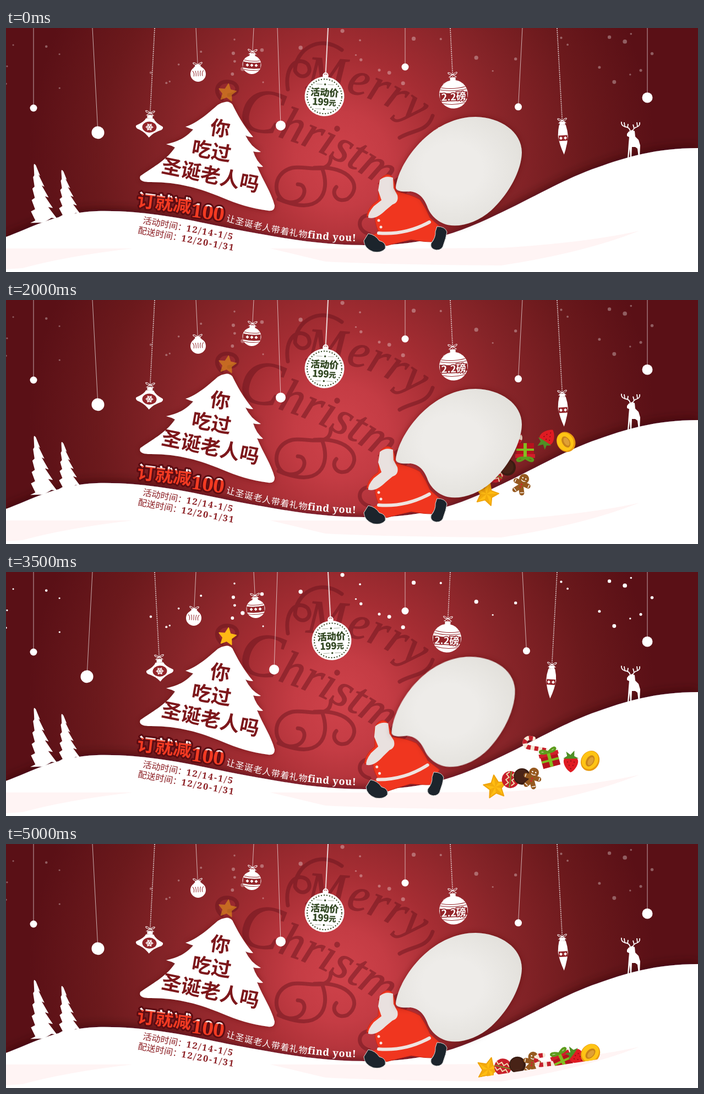
Recreate the animation shown at these times as an HTML page. Size 1257 by 445 pixels, loop 5.5 s.

```html
<!DOCTYPE html>
<html lang="zh">
<head>
<meta charset="utf-8">
<title>圣诞老人</title>
<style>
html, body { margin: 0; width: 100%; height: 100%; overflow: hidden; background: #5b1117; }
svg { display: block; width: 100%; height: 100%; }
text { font-family: "Noto Sans CJK SC", "Noto Sans CJK", sans-serif; font-weight: 900; }
.serif { font-family: "Noto Serif", "Noto Sans CJK SC", serif; font-weight: 600; }
.plain { font-weight: 500; }
.script text { font-family: "Liberation Serif", serif; font-style: italic; font-weight: 400; font-size: 86px; }
.script path { fill: none; stroke: #64121b; stroke-width: 7; stroke-linecap: round; }
.line { fill: none; stroke: #fff; }
</style>
</head>
<body>
<svg viewBox="0 0 1257 445" preserveAspectRatio="none">
<defs>
  <radialGradient id="sky" gradientUnits="userSpaceOnUse" cx="610" cy="240" r="570">
    <stop offset="0" stop-color="#cf424a"/>
    <stop offset=".15" stop-color="#c43c44"/>
    <stop offset=".33" stop-color="#a52d33"/>
    <stop offset=".55" stop-color="#862428"/>
    <stop offset=".78" stop-color="#6b191c"/>
    <stop offset="1" stop-color="#5a1016"/>
  </radialGradient>
  <radialGradient id="sack" cx=".45" cy=".48" r=".6">
    <stop offset=".4" stop-color="#eeece9"/>
    <stop offset="1" stop-color="#e2e0db"/>
  </radialGradient>
  <linearGradient id="cap" x2="0" y2="1">
    <stop offset=".28" stop-color="#fff"/>
    <stop offset=".33" stop-color="#f23a22"/>
  </linearGradient>
  <clipPath id="drift"><path d="M700 0H1257V365L857 426H700Z"/></clipPath>
  <path id="slogan" d="M399 352Q490 377 560 384T665 388"/>
  <path id="merry" d="M545 112Q660 105 765 190"/>
  <path id="xmas" d="M418 182Q560 200 730 320"/>
  <path id="star" d="M0-22 6.5-8 21-6.8 10.5 3.5 13 18 0 11-13 18-10.5 3.5-21-6.8-6.5-8Z" stroke-linejoin="round" stroke-width="2"/>
  <filter id="soft" x="-10%" y="-20%" width="120%" height="140%"><feDropShadow dx="0" dy="-3" stdDeviation="9" flood-color="#30040a" flood-opacity=".65"/></filter>
  <filter id="glow" x="-20%" y="-20%" width="140%" height="140%"><feDropShadow dx="0" dy="0" stdDeviation="6" flood-color="#50080f" flood-opacity=".5"/></filter>
</defs>

<rect width="1257" height="445" fill="url(#sky)"/>

<g class="script" fill="#64121b" stroke="#64121b" stroke-width="1.5" opacity=".45">
  <text><textPath href="#merry">Merry</textPath></text>
  <text><textPath href="#xmas"><tspan style="font-size:115px">C</tspan>hristmas</textPath></text>
  <path d="M512 112C505 70 530 50 548 66 560 85 535 98 525 78 525 40 570 10 610 40"/>
  <path d="M405 122C425 122 425 100 405 98 385 95 375 115 392 130"/>
  <path d="M590 235C590 270 545 250 520 255 480 265 485 315 515 318 545 320 550 285 530 285M560 255C625 250 650 290 620 312 600 320 590 300 600 290M575 258C590 300 570 345 495 312"/>
  <path d="M668 342C640 335 632 368 660 376M715 200C740 185 765 190 775 160"/>
</g>

<g id="dots" fill="#fff"></g>
<g id="hung" fill="#fff"></g>

<g filter="url(#soft)">
  <path fill="#fff" d="M0 381C40 367 90 337 165 334 260 332 340 352 400 364 500 383 570 396 650 396 730 397 790 386 860 355
    950 315 1010 276 1075 254 1125 236 1180 219 1257 219V445H0Z"/>
</g>
<path fill="#fff4f4" d="M0 402H230Q110 416 30 438L0 440ZM480 402Q700 403 900 401 1050 392 1150 370 1050 410 900 433 700 432 580 426 480 402Z"/>

<g id="firs" fill="#fff"></g>

<g fill="#fff">
  <path d="M1128 193L1131 189 1137 186 1142 188 1143 198 1149 204 1152 214 1151 236H1149L1147 220 1143 217 1137 217 1136 238H1134L1133 220 1131 238H1129L1131 210 1132 199 1128 197Z"/>
  <path class="line" stroke-width="1.8" d="M1134 188Q1133 181 1124 180 1117 178 1118 171M1124 180L1123 172M1129 182L1130 175M1138 188Q1140 182 1147 180 1152 178 1151 172M1147 180L1146 172M1141 183L1139 176"/>
</g>

<path filter="url(#glow)" fill="#fff" d="M398 135Q405 133 411 139C419 155 430 177 449 199Q441 199 435 196 444 216 463 226 456 227 449 225
  454 242 467 253 461 254 456 252C466 277 482 300 488 324Q488 335 476 333C445 329 420 321 392 309 352 292 310 280 258 281
  Q240 280 244 270C263 256 290 243 307 218Q300 214 291 212C312 207 326 201 340 185Q333 183 326 180C348 174 372 151 385 140Q391 136 398 135Z"/>
<use href="#star" id="top" transform="translate(402 118) rotate(8) scale(.75)" fill="#ffb915" stroke="#ffb915"/>

<g fill="#7d171b" font-size="36" text-anchor="middle">
  <text transform="translate(387 196) rotate(9)">你</text>
  <text transform="translate(371 237) rotate(10)">吃过</text>
  <text transform="translate(369 281) rotate(11.5)">圣诞老人吗</text>
</g>

<g fill="url(#cap)" stroke="#5c0c12" stroke-width="6" stroke-linejoin="round" paint-order="stroke">
  <text transform="translate(237 325) rotate(7)" font-size="33">订就减</text>
  <text class="serif" transform="translate(335 344) rotate(8)" font-size="36">100</text>
</g>
<text class="plain" fill="#fff" font-size="16" letter-spacing=".8"><textPath href="#slogan">让圣诞老人带着礼物<tspan class="serif" font-size="18">find you!</tspan></textPath></text>
<g fill="#8b1d22" font-size="16">
  <text class="plain" transform="translate(248 356) rotate(10.5)">活动时间：<tspan class="serif" letter-spacing="2.2">12/14-1/5</tspan></text>
  <text class="plain" transform="translate(239 374) rotate(10.5)">配送时间：<tspan class="serif" letter-spacing="2.2">12/20-1/31</tspan></text>
</g>

<g id="gifts" clip-path="url(#drift)"></g>

<g id="santa">
  <path fill="#f0361f" stroke="#c92617" d="M677 291Q676 272 692 267 706 266 708 298 735 303 752 313 764 330 770 346L790 364 773 390Q758 390 736 386 710 392 691 397L660 381 677 372Q667 350 672 340L655 344Q657 326 676 314Z"/>
  <path fill="#e9e1df" d="M679 277Q690 268 703 273L704 292 711 305Q714 318 702 322L690 332Q672 350 658 346 657 338 668 325L682 314 676 296Z"/>
  <path fill="none" stroke="#efe4e0" stroke-width="6" stroke-linecap="round" d="M677 374Q725 378 769 354"/>
  <g fill="#f6e5e0"><circle cx="677" cy="351" r="2.5"/><circle cx="681" cy="363" r="2.5"/></g>
  <path filter="url(#glow)" fill="url(#sack)" d="M708 291C711 262 735 222 765 197 792 174 823 162 853 162 898 163 937 189 937 227
    936 262 912 304 882 332 856 355 826 364 802 359 783 354 770 340 765 325 758 307 748 300 735 298Q709 300 708 291Z"/>
</g>
<g fill="#1c242c" stroke="#d8d5d2">
  <path id="bootL" d="M658 375Q671 377 678 388 691 391 689 402 682 411 667 408 651 402 650 388Z"/>
  <path id="bootR" d="M783 362Q798 362 801 372 799 384 795 394 793 405 782 405 770 403 772 393 781 382 780 371Z"/>
</g>
</svg>

<script>
const $ = id => document.getElementById(id);
const put = (id, html) => { $(id).innerHTML = html; };
const circle = (x, y, r, more = '') => `<circle cx="${x}" cy="${y}" r="${r}" ${more}/>`;
const path = (d, more = '') => `<path d="${d}" ${more}/>`;
const repeat = (n, f) => Array.from({ length: n }, (_, i) => f(i)).join('');
const red = '#94262b';

let seed = 7;
const random = () => (seed = seed * 16807 % 2147483647) / 2147483647;
put('dots', repeat(42, () => circle(random() * 1249, 5 + random() * 105, 1.5 + 2.5 * random() ** 2)));

// A leaning fir: jagged edges that widen downwards
const fir = (x, y, h) => {
  const edge = side => Array.from({ length: 6 }, (_, i) => {
    const w = side * (2 + i * h * .042), low = i * h / 5.3;
    return `L${w} ${low + 3}L${w * .6} ${low}`;
  });
  return path(`M0 0${edge(1).join('')}L0 ${h}${edge(-1).reverse().join('')}Z`, `transform="translate(${x} ${y}) rotate(-9)"`);
};
put('firs', fir(52, 248, 108) + fir(102, 259, 86));

// Ornaments are drawn around their centre
const ball = r => circle(0, 0, r);
const bow = y => path(`M0 ${y}C-12 ${y - 10}-10 ${y + 2} 0 ${y}C12 ${y - 10} 10 ${y + 2} 0 ${y}L-7 ${y + 5}M0 ${y}L7 ${y + 5}`, 'class="line"');
const collar = y => `<rect x="-5" y="${y}" width="10" height="6"/>`;
const stripes = (...d) => path(d.join(''), `fill="none" stroke="${red}"`);
const diamonds = n => repeat(n, i => path(`M${(i - n / 2) * 8 + 1} 1l3-3 3 3-3 3z`));
const flake = repeat(3, i => `<path class="line" stroke-width="1.5" d="M-7 0H7M-5-2 -3 0-5 2M5-2 3 0 5 2" transform="rotate(${i * 60})"/>`);
const drop = bow(-26) + collar(-22) + path('M-7-16H7Q10-9 24-2 26 1 22 4 8 9 0 19-8 9-22 4-26 1-24-2-10-9-7-16Z')
  + `<ellipse rx="13" ry="10" fill="${red}"/>` + flake;
const ribbed = bow(-17) + collar(-17) + ball(14) + stripes(repeat(5, i => `M${i * 5 - 10}-6Q${i * 3 - 6}-2 ${i * 4 - 8} 4`));
const banded = bow(-24) + collar(-21) + ball(17) + path('M-16-5Q0-2 16-5V6Q0 9-16 6Z', `fill="${red}"`)
  + diamonds(3) + stripes('M-14-8Q0-5 14-8M-14 9Q0 12 14 9');
const sign = circle(0, -39, 4, 'class="line" stroke-width="2"') + collar(-40) + ball(36)
  + circle(0, 0, 31.5, 'fill="none" stroke="#2d431d" stroke-width="2" stroke-dasharray="2 3"')
  + '<g fill="#2d431d" stroke="#2d431d" stroke-width=".4" text-anchor="middle" font-size="17"><text y="-1">活动价</text>'
  + '<text y="16">199<tspan font-size="13">元</tspan></text>'
  + circle(0, -22, 1.5) + circle(0, 23, 1.5) + path('M-16-22H-5M5-22H16M-16 23H-5M5 23H16') + '</g>';
const pound = bow(-36) + collar(-31) + ball(26) + stripes('M-22-13Q0-8 22-13M-24-9Q0-4 24-9M-20 16Q0 21 20 16')
  + path('M-25-4Q0 0 25-4V9Q0 14-25 9Z', `fill="${red}"`)
  + `<text y="11" font-size="18" text-anchor="middle" stroke="${red}" stroke-width="3" paint-order="stroke">2.2磅</text>`;
const spindle = bow(-31) + collar(-29) + path('M-6-23H6Q9-12 9-2 7 14 0 31-7 14-9-2-9-12-6-23Z')
  + path('M-8-4H8V6H-8Z', `fill="${red}"`) + diamonds(2);

// [pivot x, swing to either side, y, drawing, string]
const plain = 'stroke-width=".8"', beads = 'stroke-width="1.6" stroke-dasharray="2 1.5"', cord = 'stroke-width="2"';
const hung = [
  [50, 0, 146, ball(6.5), plain],
  [157, -10, 191, ball(11.5), plain],
  [270, 9.5, 181, drop, beads],
  [345, -4, 84, ribbed, plain],
  [450, 3.5, 67, banded, plain],
  [493, -6, 178, ball(9), plain],
  [585, 6.5, 125, sign, cord],
  [725, 0, 71, ball(6.5), plain],
  [807, -6, 121, pound, beads],
  [938, 7.5, 144, ball(6.5), plain],
  [1001, -11, 200, spindle, beads],
  [1165, 0, 127, ball(9.5), plain]
];
put('hung', hung.map(([, , y, art, string]) =>
  `<g><path class="line" d="M0 0V${y}" opacity=".8" ${string}/><g transform="translate(0 ${y})">${art}</g></g>`).join(''));

const peach = '<ellipse rx="16.5" ry="19" fill="#e89a10"/><ellipse cx="-1" cy="-1" rx="14.5" ry="17" fill="#ffc414"/>'
  + '<ellipse rx="7" ry="11" fill="#c98419"/><ellipse cx="1" rx="4.5" ry="8" fill="#dfa035"/>';
const berry = path('M0 20C-9 15-16 2-12-5Q0-13 12-5C16 2 9 15 0 20Z', 'fill="#e01b22"')
  + path('M-6 0v2M0-2v2M6 0v2M-3 6v2M4 6v2M0 12v2', 'stroke="#7d0d12" stroke-width="1.5"')
  + path('M0-5L-14-5-7-10-9-18-1-12 6-20 6-10 14-6Z', 'fill="#4f8f25"');
const box = path('M-16-7H16V18H-16Z', 'fill="#b5121d"') + path('M-18-9H18V-2H-18Z', 'fill="#d01f2a"')
  + path('M-3-9H3V18H-3ZM-16 4H16V8H-16Z', 'fill="#83bd20"')
  + path('M0-9C-18-23-20-6 0-9C18-23 20-6 0-9Z', 'fill="none" stroke="#5d9c1c" stroke-width="4"');
const hook = 'M-7 21V-11C-7-22 10-22 10-10V-5';
const cane = path(hook, 'fill="none" stroke="#f5e6d5" stroke-width="8" stroke-linecap="round"')
  + path(hook, 'fill="none" stroke="#c51f2b" stroke-width="8" stroke-dasharray="7 7"');
const man = path('M0-9V3L-7 14M0 3L7 14M-12-2H12', 'fill="none" stroke="#96591f" stroke-width="9" stroke-linecap="round"')
  + circle(0, -11, 9, 'fill="#96591f"') + circle(-3, -12, 1.3, 'fill="#fff"') + circle(3, -12, 1.3, 'fill="#fff"')
  + path('M-4-8Q0-5 4-8M-13-5V1M13-5V1M-10 12L-4 15M10 12L4 15', 'fill="none" stroke="#fff" stroke-width="1.4"')
  + circle(0, 0, 1.5, 'fill="#d4202b"') + circle(0, 5, 1.5, 'fill="#d4202b"');
const choc = circle(0, 0, 15, 'fill="#3a1c12"') + circle(-1, -1, 12, 'fill="#482317"');
const zigzag = y => `M-14 ${y}` + repeat(5, i => `l5 ${i % 2 ? -5 : 5}`);
const bauble = circle(0, 0, 15.5, 'fill="#c81f2a"') + path(zigzag(-8) + zigzag(3), 'fill="none" stroke="#f0d9b0" stroke-width="2"')
  + path('M-15 0H15', 'stroke="#6d9a2a" stroke-width="2"');
const gold = '<use href="#star" fill="#ffbd12" stroke="#f0a40a"/>'
  + repeat(5, i => `<path d="M0-22 0 0 6.5-8Z" fill="#eda10a" opacity=".65" transform="rotate(${i * 72})"/>`);

// [drawing, start, landing, landing angle, spin on the way], from left to right
const gifts = [
  [gold, [822, 330], [890, 408], -15, 60],
  [bauble, [798, 279], [918, 404], 60, 300],
  [choc, [827, 263], [939, 401], 0, 0],
  [man, [875, 311], [957, 393], 15, 20],
  [cane, [780, 199], [964, 344], -150, 560],
  [box, [802, 242], [990, 362], -80, 520],
  [berry, [840, 195], [1029, 384], -70, 570],
  [peach, [877, 205], [1064, 380], 50, -160]
];
put('gifts', gifts.map(g => `<g>${g[0]}</g>`).join(''));

const mix = (a, b, p) => a + (b - a) * p;
const place = (el, x, y, turn) => el.setAttribute('transform', `translate(${x} ${y}) rotate(${turn})`);

function draw(step) {
  const swung = step % 2;
  hung.forEach(([x, swing, y], i) =>
    place($('hung').children[i], x, 0, Math.atan2(swung ? -swing : swing, y) * 180 / Math.PI));
  $('dots').setAttribute('opacity', swung ? 1 : .32);
  $('top').setAttribute('opacity', swung ? 1 : .45);
  $('santa').setAttribute('transform', swung ? 'rotate(-4 740 400)' : '');
  $('bootL').setAttribute('transform', swung ? 'translate(4 4)' : '');
  $('bootR').setAttribute('transform', swung ? 'translate(-6 3)' : '');

  // Gifts fly out and fall, then roll into an even row along the snow
  const fall = Math.min(step / 8, 1), settle = Math.max(step / 2 - 4, 0);
  gifts.forEach(([, from, land, angle, spin], i) => {
    const x = mix(from[0], land[0], 1 - (1 - fall) ** 2);
    const y = mix(from[1], land[1], fall ** 1.7);
    const restX = 876 + 26.5 * i, restY = 411 - 4.1 * i;
    const roll = (restX - land[0]) * 3 * settle;
    place($('gifts').children[i], mix(x, restX, settle), mix(y, restY, settle), angle + spin * (1 - fall) + roll);
  });
}

function tick() {
  draw(Math.floor(performance.now() % 5500 / 500));
  requestAnimationFrame(tick);
}
tick();
</script>
</body>
</html>
```
